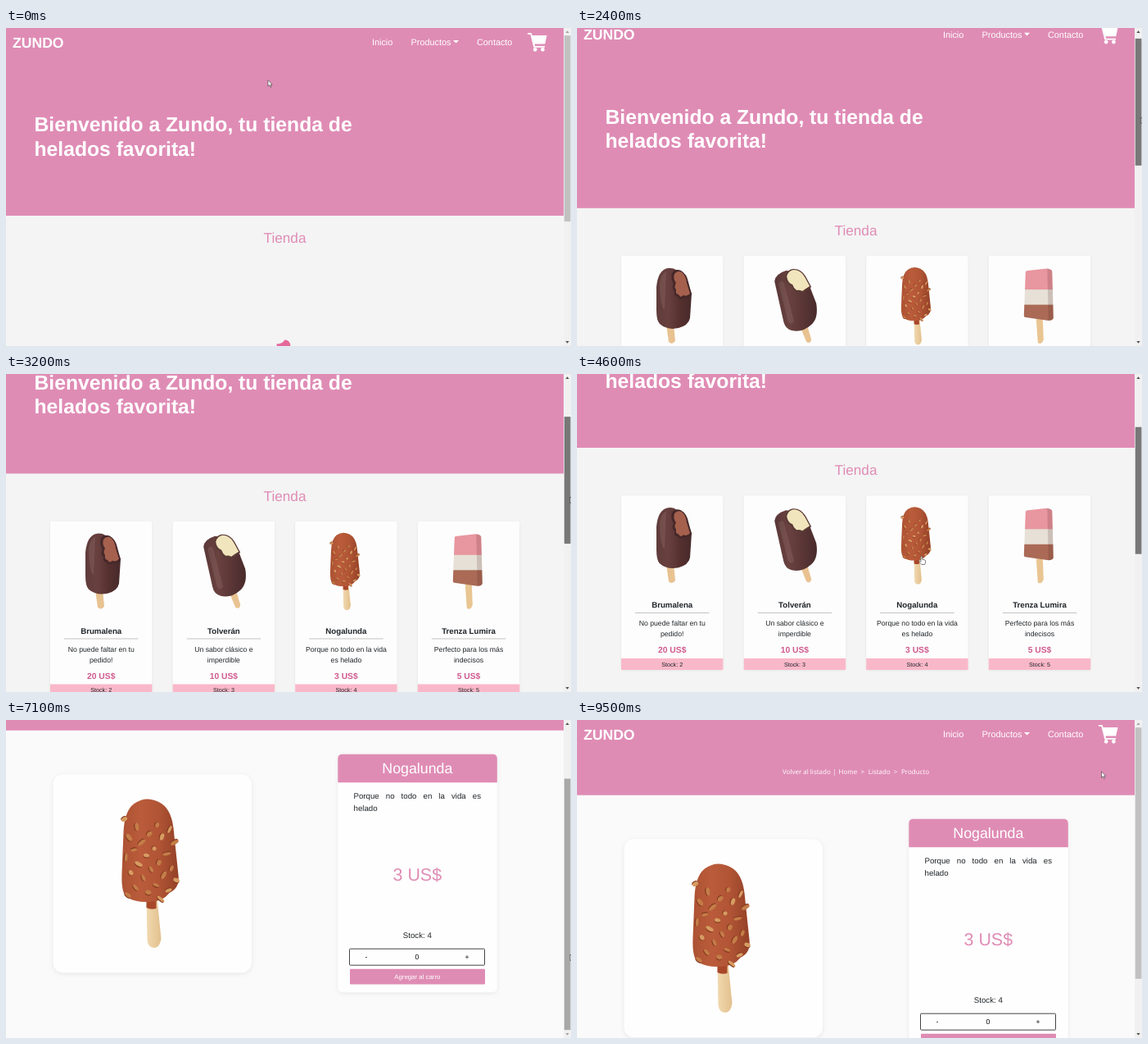
An HTML page with a canvas that plays this animation: 690 by 388 pixels, repeating every 9600 ms.

```html
<!DOCTYPE html>
<html lang="es">
<head>
<meta charset="utf-8">
<title>Tienda de helados</title>
<style>
html, body { margin: 0; width: 100%; height: 100%; overflow: hidden; background: #f4f4f4; }
canvas { display: block; width: 690px; height: 388px; }
</style>
</head>
<body>
<canvas id="stage" width="690" height="388"></canvas>
<script>
const c = document.getElementById('stage').getContext('2d');
c.textRendering = 'geometricPrecision';
const W = 690, H = 388, VIEW = 681, LOOP = 9600, STEP = 100;
const PINK = '#df8cb5', INK = '#212529';
const SANS = '"Liberation Sans", Arial, sans-serif';
const HUMANIST = '"Open Sans", sans-serif';

const LIST_READY = 900, CLICK = 4800, PRODUCT_READY = 6600;

const products = [
  { x: 54, name: 'Brumalena', text: ['No puede faltar en tu', 'pedido!'], price: 20, stock: 2, draw: chocolateBar },
  { x: 203.7, name: 'Tolverán', text: ['Un sabor clásico e', 'imperdible'], price: 10, stock: 3, draw: creamBar },
  { x: 353.2, name: 'Nogalunda', text: ['Porque no todo en la vida', 'es helado'], price: 3, stock: 4, draw: smallNutBar },
  { x: 502.8, name: 'Trenza Lumira', text: ['Perfecto para los más', 'indecisos'], price: 5, stock: 5, draw: stripedBar },
];

// Keys are [time, value, ...]; values are interpolated linearly.
const listScroll = [[2200, 0], [2400, 9.2], [3200, 107.5], [3900, 139]];
const productScroll = [[7500, 79], [8200, 36], [8800, 0]];
const pointer = [
  [0, 320, 63.5], [800, 320, 63.5], [1300, 266, 200], [1400, 266, 200], [2000, 689, 106],
  [2200, 689, 106], [2400, 689, 109], [3200, 689, 150], [3900, 689, 162], [4300, 689, 162],
  [4600, 418, 222], [4900, 418, 222], [5300, 518, 215], [5400, 530, 215], [6000, 689, 286],
  [7500, 689, 286], [8200, 689, 251], [8800, 689, 223], [8900, 689, 215], [9400, 640.5, 62.8],
];

function at(keys, t) {
  if (t <= keys[0][0]) return keys[0].slice(1);
  for (let i = 1; i < keys.length; i++) {
    const a = keys[i - 1], b = keys[i];
    if (t <= b[0]) {
      const k = (t - a[0]) / (b[0] - a[0]);
      return a.slice(1).map((v, j) => v + (b[j + 1] - v) * k);
    }
  }
  return keys[keys.length - 1].slice(1);
}

function text(s, x, y, size, color, align = 'left', weight = 400, family = SANS) {
  c.font = `${weight} ${size}px ${family}`;
  c.textAlign = align;
  c.fillStyle = color;
  c.fillText(s, x, y);
}

function justified(s, x, y, width, size, color) {
  c.font = `400 ${size}px ${SANS}`;
  const words = s.split(' ');
  const widths = words.map(w => c.measureText(w).width);
  const gap = (width - widths.reduce((a, b) => a + b)) / (words.length - 1);
  words.forEach((w, i) => {
    text(w, x, y, size, color);
    x += widths[i] + gap;
  });
}

function rect(x, y, w, h, color) {
  c.fillStyle = color;
  c.fillRect(x, y, w, h);
}

function panel(x, y, w, h, r, color, blur = 0) {
  c.save();
  c.shadowColor = 'rgba(0,0,0,.08)';
  c.shadowBlur = blur;
  c.shadowOffsetY = blur / 4;
  c.fillStyle = color;
  c.beginPath();
  c.roundRect(x, y, w, h, r);
  c.fill();
  c.restore();
}

function shape(d, color) {
  c.fillStyle = color;
  c.fill(new Path2D(d));
}

function shade(x0, x1, ...colors) {
  const g = c.createLinearGradient(x0, 0, x1, 0);
  colors.forEach((color, i) => g.addColorStop(i / (colors.length - 1), color));
  return g;
}

function placed(x, y, scale, draw) {
  c.save();
  c.translate(x, y);
  c.scale(scale, scale);
  draw();
  c.restore();
}

function random(seed) {
  return () => (seed = (seed * 16807) % 2147483647) / 2147483647;
}

// Small bars: origin at the card's top left corner.
function chocolateBar() {
  shape('M55 84 L64 83 L66 104 Q62 109 58 105 Z', '#e9c291');
  shape('M43 38 Q45 17 57 15 Q64 14 68 18 L78 24 L86 46 L84 76 Q82 85 70 88 Q56 91 47 83 Q43 79 43 66 Z',
    shade(43, 86, '#5f3b3a', '#68413f', '#55302f', '#472a2a'));
  shape('M62 21 Q66 15 73 18 Q80 22 82 32 L86 47 Q82 53 77 51 Q72 55 69 50 Q64 50 65 43 Q61 40 64 34 Q60 28 62 21 Z', '#45282a');
  shape('M65 22 Q69 17 74 20 Q79 24 80 33 L84 46 Q80 50 76 48 Q72 52 70 47 Q66 47 67 41 Q64 38 67 33 Q63 28 65 22 Z', '#a5614d');
  shape('M47 32 Q49 22 55 19 L53 66 Q47 60 47 32 Z', 'rgba(255,225,220,.10)');
}

function creamBar() {
  placed(2.5, 0, 1, () => {
    shape('M67 88 L75 85 L80 102 Q79 108 74 105 Z', '#e9c291');
    shape('M35 31 Q36 22 49 18 L66 20 L76 32 L86 58 Q89 76 80 84 Q69 94 56 91 Q48 89 46 80 Z',
      shade(35, 88, '#5a3738', '#69423f', '#593536', '#472a2a'));
    shape('M48 26 Q50 17 57 16 Q67 15 73 25 L80 38 Q74 42 70 45 Q65 43 61 45 Q57 41 56 37 Q49 35 48 26 Z', '#5a3a36');
    shape('M50 25 Q52 18 58 17 Q67 17 72 26 L78 37 Q73 40 69 43 Q65 41 62 42 Q58 39 57 35 Q51 33 50 25 Z', '#f1e5bd');
    shape('M40 34 Q44 27 47 34 L59 80 Q54 86 51 78 Z', 'rgba(255,225,220,.09)');
  });
}

function smallNutBar() {
  placed(61, 61, 0.52, nutBar);
}

function stripedBar() {
  shape('M58 77 L66 77 L67 102 Q65 109 60 106 Z', '#e9c592');
  c.save();
  c.clip(new Path2D('M45 20 Q45 18 48 18 L71 15.5 Q77 16 77.5 19 L79 76 Q78 79 73 79 L45 75 Q43 75 43 73 Z'));
  rect(40, 10, 42, 32, '#e8969f');
  rect(40, 41, 42, 20, '#e6e0d6');
  rect(40, 59.5, 42, 24, '#aa6a56');
  shape('M71.5 14 H82 V82 H73 Z', 'rgba(70,20,20,.16)');
  c.restore();
}

// Large bar, centred on the origin.
function nutBar() {
  shape('M-5 30 L8 30 L13 80 Q11 91 5 91 Q-3 91 -4 82 Z', shade(-5, 13, '#f1d9b0', '#e2c08d'));
  shape('M-5 30 L7 30 L7 43 Q0 45 -5 42 Z', '#a8472a');
  shape('M-33 -50 Q-32 -76 -20 -85 Q-6 -95 10 -87 Q25 -80 28 -55 L34 2 Q36 18 23 24 Q14 36 -5 35 Q-20 35 -29 29 Q-36 24 -35 0 Z',
    shade(-35, 34, '#ac5233', '#ba5c3b', '#b05435', '#944127'));
  const rnd = random(4127);
  for (let i = 0; i < 28; i++) {
    const y = -66 + (i / 27) * 94 + rnd() * 5;
    const x = -32 + ((i * 0.618) % 1) * 65;
    c.save();
    c.translate(x, y);
    c.rotate(rnd() * 3);
    const long = 2.5 + rnd() * 3.5, wide = 1.6 + rnd() * 1.2;
    for (const [dy, color] of [[1.2, '#85391f'], [0, i % 3 ? '#c47d48' : '#d79c62']]) {
      c.fillStyle = color;
      c.beginPath();
      c.ellipse(0, dy, long, wide, 0, 0, 7);
      c.fill();
    }
    c.restore();
  }
}

function loader(top) {
  placed(340.5, top, 1, () => {
    shape('M-40 86 L40 86 L4 183 Q0 187 -4 183 Z', '#eebf86');
    shape('M-10 5 Q-3 5 0 0 Q7 0 7 9 Q15 20 28 30 Q45 44 36 58 Q54 70 46 84 Q38 96 0 96 Q-38 96 -46 84 Q-54 70 -36 58 Q-45 44 -28 30 Q-8 22 -10 5 Z', '#e5689a');
  });
}

function navigation() {
  text('ZUNDO', 8, 23.6, 17.6, '#fff', 'left', 700);
  text('Inicio', 447, 21, 10.85, '#fff');
  text('Productos', 494.6, 21, 10.85, '#fff');
  text('Contacto', 575, 21, 10.85, '#fff');
  shape('M546 15 H553 L549.5 18.6 Z', '#fff');
  shape('M637 6 H641.6 L642.6 9 H660.5 L658.2 19.5 H645.5 L646 22 H658 V23.8 H644.4 L640.4 7.8 H637 Z', '#fff');
  c.beginPath();
  c.arc(646.2, 26.3, 2.4, 0, 7);
  c.arc(655.4, 26.3, 2.4, 0, 7);
  c.fill();
}

function card(p) {
  const top = 287.3, mid = p.x + 62.2;
  panel(p.x, top, 124.4, 212.5, 2, '#fdfdfd', 3);
  placed(p.x, top, 1, p.draw);
  text(p.name, mid, 424.4, 9.7, INK, 'center', 700);
  rect(p.x + 17, 430, 90.5, 1, '#c4c4c4');
  p.text.forEach((line, i) => text(line, mid, 446 + i * 13, 8.7, INK, 'center'));
  text(`${p.price} US$`, mid, 479, 10.3, '#cf5a8e', 'center', 700);
  rect(p.x, 486, 124.4, 14, '#f9b8c9');
  text(`Stock: ${p.stock}`, mid, 495.8, 7.2, INK, 'center');
}

function listPage(ready) {
  rect(0, 0, VIEW, 229, PINK);
  navigation();
  text('Bienvenido a Zundo, tu tienda de', 34.5, 126, 24.7, '#fff', 'left', 700);
  text('helados favorita!', 34.5, 155.6, 24.7, '#fff', 'left', 700);
  text('Tienda', 340.5, 262, 17.2, PINK, 'center');
  if (ready) products.forEach(card);
  else loader(380.5);
}

function breadcrumb() {
  [['Volver al listado', 251], ['|', 312], ['Home', 319.5], ['>', 346.5],
   ['Listado', 355.8], ['>', 386.7], ['Producto', 396]].forEach(([s, x]) =>
    text(s, x, 66, 8, '#fff', 'left', 400, HUMANIST));
}

function productPage(ready) {
  rect(0, 0, VIEW, 91.7, PINK);
  navigation();
  breadcrumb();
  if (!ready) return loader(151.5);

  const p = products[2], mid = 502.3;
  panel(57.5, 145.3, 242.5, 242, 12, '#fefefe', 6);
  placed(176.5, 266, 1, nutBar);

  panel(405.3, 120.8, 194.5, 290.5, 5, '#fefefe', 5);
  panel(405.3, 120.8, 194.5, 34.5, [5, 5, 0, 0], PINK);
  text(p.name, mid, 144.3, 17.8, '#fff', 'center');
  justified('Porque no todo en la vida es', 424.5, 175.2, 155.5, 9.7, INK);
  text('helado', 424.5, 190, 9.7, INK);
  text(`${p.price} US$`, mid, 274.6, 21.4, PINK, 'center');
  text(`Stock: ${p.stock}`, mid, 344.5, 9.7, INK, 'center');
  c.strokeStyle = '#444';
  c.lineWidth = 1;
  c.beginPath();
  c.roundRect(419.5, 358.2, 165, 20, 1);
  c.stroke();
  [['-', 440], ['0', 502], ['+', 563]].forEach(([s, x]) => text(s, x, 371.3, 8.6, '#000', 'center'));
  panel(420, 382.8, 165, 18.6, 1, PINK);
  text('Agregar al carro', mid, 394.8, 7.85, '#fff', 'center');
}

function scrollbar(scroll, pageHeight, color) {
  const start = 9.2, track = 369;
  rect(VIEW, 0, W - VIEW, H, '#f1f1f1');
  rect(681.8, start + scroll * track / pageHeight, 7.6, track * H / pageHeight, color);
  shape('M683.3 6 L685.5 3.2 L687.7 6 Z', scroll > 0 ? '#505050' : '#a3a3a3');
  shape('M683.3 382 L685.5 384.8 L687.7 382 Z', scroll + H < pageHeight - 1 ? '#505050' : '#a3a3a3');
}

function cursor(x, y, hand) {
  c.save();
  c.translate(x, y);
  c.strokeStyle = '#333';
  c.lineWidth = 0.6;
  c.fillStyle = '#fff';
  const d = hand
    ? 'M2 1 Q3 -.4 3.8 1 V4.2 L7 5 Q8 5.5 7.7 8 L6.6 10.5 H2.8 L-.3 6.8 Q0 5.4 2 7 Z'
    : 'M0 0 V7.6 L1.7 6 L3 8.8 L4.1 8.3 L3 5.6 H5.2 Z';
  const path = new Path2D(d);
  c.fill(path);
  c.stroke(path);
  c.restore();
}

function view(t) {
  if (t < CLICK) {
    const ready = t >= LIST_READY;
    return { page: listPage, ready, scroll: at(listScroll, t)[0], height: ready ? 924 : 631, bg: '#f4f4f4' };
  }
  const ready = t >= PRODUCT_READY;
  return {
    page: productPage, ready, bg: '#fafafa',
    scroll: ready ? at(productScroll, t)[0] : 13.6,
    height: ready ? 467 : 401.6,
  };
}

function thumbColor(t) {
  const dragging = (t >= 2200 && t < CLICK) || (t >= 7500 && t < 8900);
  const hovering = (t >= 2000 && t < 2200) || (t >= 6000 && t < 7500);
  return dragging ? '#787878' : hovering ? '#a8a8a8' : '#c1c1c1';
}

function render(t) {
  const v = view(t);
  rect(0, 0, W, H, v.bg);
  c.save();
  c.translate(0, -v.scroll);
  v.page(v.ready);
  c.restore();
  scrollbar(v.scroll, v.height, thumbColor(t));
  const [x, y] = at(pointer, t);
  cursor(x, y, t >= 4500 && t < CLICK);
}

const began = performance.now();
function tick() {
  const t = (performance.now() - began) % LOOP;
  render(Math.floor(t / STEP) * STEP);
  requestAnimationFrame(tick);
}
tick();
</script>
</body>
</html>
```
